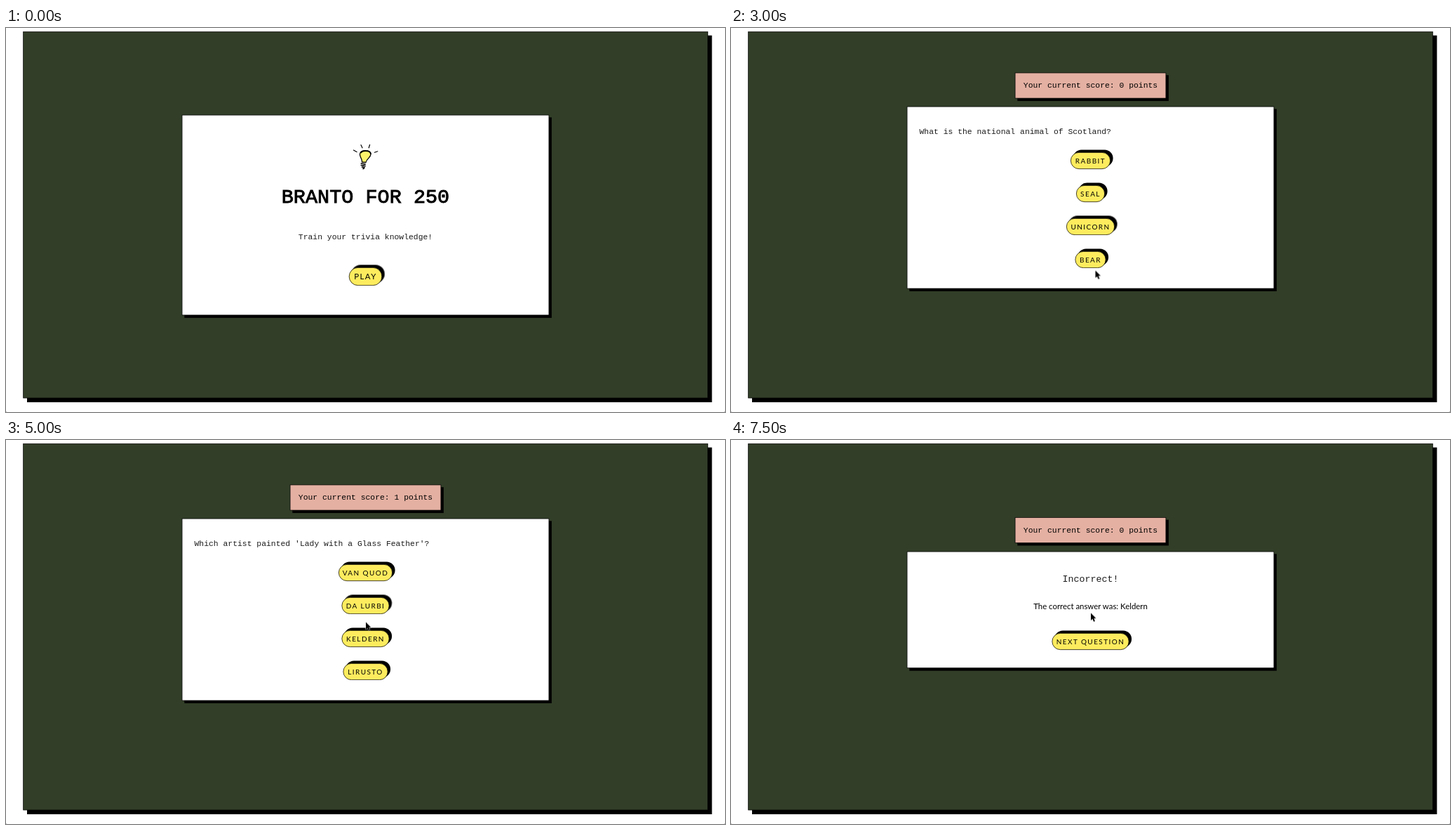
An HTML page for the animation above (8 s loop, 1025x547 px).

```html
<!DOCTYPE html>
<html lang="en">
<head>
<meta charset="utf-8">
<title>Trivia game</title>
<style>
  html, body { margin: 0; width: 100%; height: 100%; overflow: hidden; background: #fff; }
  svg { display: block; width: 100%; height: 100%; }
  text { white-space: pre; }
  .mono { font-family: "Liberation Mono", monospace; font-size: 11.4px; fill: #1c1c1c; }
  .score { fill: #000; }
  .title { font-size: 28.5px; fill: #000; stroke: #000; stroke-width: .9px; }
  .verdict { font-size: 13.3px; }
  .lato { font-family: Lato, sans-serif; font-size: 11.4px; }
  .label { font-size: 10px; letter-spacing: 1.43px; }
  .label.big { font-size: 11.4px; }
  .status { font-family: "Liberation Sans", sans-serif; font-size: 9.35px; fill: #fff; }
  .mid { text-anchor: middle; }
</style>
</head>
<body>
<svg id="stage" viewBox="0 0 1025 547"></svg>
<script>
const LOOP = 8000, CENTER = 512.5, BORDER = .72, CARD = 523.6;
const GREEN = '#323e28', PINK = '#e4b0a2', YELLOW = '#feec5e';
const stage = document.getElementById('stage');

function add(parent, tag, attrs = {}, content = '') {
  const el = document.createElementNS('http://www.w3.org/2000/svg', tag);
  for (const key in attrs) el.setAttribute(key, attrs[key]);
  el.textContent = content;
  parent.append(el);
  return el;
}

// Holds each value until the next step; steps are [ms, value].
function hold(el, prop, steps) {
  const frames = steps.map(([ms, value]) => ({ offset: ms / LOOP, [prop]: value, easing: 'step-end' }));
  frames.push({ offset: 1, [prop]: steps[steps.length - 1][1] });
  el.animate(frames, { duration: LOOP, iterations: Infinity });
}

function during(el, prop, [from, to], inside, outside) {
  const steps = from > 0 ? [[0, outside], [from, inside]] : [[0, inside]];
  if (to < LOOP) steps.push([to, outside]);
  hold(el, prop, steps);
}

function scene(from, to) {
  const g = add(stage, 'g');
  during(g, 'opacity', [from, to], 1, 0);
  return g;
}

function write(parent, cls, x, y, content) {
  return add(parent, 'text', { class: cls, x, y }, content);
}

// Box with its border drawn inside the given outer size, centred on the stage.
function bordered(parent, width, y, height, fill, radius = 0) {
  return add(parent, 'rect', {
    x: CENTER - (width - BORDER) / 2, y: y + BORDER / 2,
    width: width - BORDER, height: height - BORDER,
    rx: radius, fill, stroke: '#000', 'stroke-width': BORDER
  });
}

function panel(parent, width, y, height, fill, drop = 3.6) {
  add(parent, 'rect', { x: CENTER - width / 2 + drop, y: y + drop, width, height });
  bordered(parent, width, y, height, fill);
}

function scoreBox(parent, y, points) {
  panel(parent, 215.6, y, 36.8, PINK);
  write(parent, 'mono score mid', CENTER, y + 21.6, `Your current score: ${points} points`);
}

function pill(parent, label, width, y, { height = 24, big = false, hover, picked } = {}) {
  const x = CENTER - width / 2;
  const shadow = add(parent, 'rect', { x, y, width, height, rx: height / 2 });
  shadow.style.transform = 'translate(3.6px, -3.6px)';
  if (hover) during(shadow, 'transform', hover, 'translate(5.7px, -5.7px)', 'translate(3.6px, -3.6px)');
  const face = bordered(parent, width, y, height, YELLOW, (height - BORDER) / 2);
  if (picked) {
    during(face, 'fill', picked, PINK, YELLOW);
    const ring = add(parent, 'g', { fill: 'none' });
    for (const [stroke, size] of [['#fff', 2.6], ['#e24b9d', 1.1]])
      add(ring, 'rect', { x, y: y + .3, width, height: height - .6, rx: 1.5, stroke, 'stroke-width': size });
    during(ring, 'opacity', picked, 1, 0);
  }
  write(parent, `lato label mid${big ? ' big' : ''}`, CENTER, y + height / 2 + (big ? 4.2 : 3.6), label);
}

function question(from, to, points, prompt, answers) {
  const g = scene(from, to);
  scoreBox(g, 63.6, points);
  panel(g, CARD, 111.7, 259.7, '#fff');
  write(g, 'mono', 268.5, 151, prompt);
  answers.forEach(([label, width, options], i) => pill(g, label, width, 177 + 47 * i, options));
}

function bulb(parent) {
  const g = add(parent, 'g', { stroke: '#000', fill: 'none', 'stroke-linecap': 'round', 'stroke-linejoin': 'round' });
  add(g, 'path', { d: 'M495.5 174 500 176.6M506 166.5 508 170.8M518.6 166.3 517.2 170.8M525.3 177.2 529.8 175.8', 'stroke-width': 1.2 });
  add(g, 'path', {
    d: 'M507.5 191C508 186 504 184 504.5 179.5C505 175.5 508 174.7 512 174.8C517 174.7 520 176.5 520 180C519.8 185 514 186 513 191.5Z',
    fill: '#fdf36b', 'stroke-width': 1.3
  });
  add(g, 'path', { d: 'M506 177.5Q508 174.5 513 175Q519 175 520 179', 'stroke-width': 1.9 });
  add(g, 'path', { d: 'M506.3 193 512 194.2M506.3 195.5 512 196.6M507.5 198 511 198.8M509 200.3H510', 'stroke-width': 1.7 });
}

panel(stage, 976.4, 4.9, 522.5, GREEN, 5.7);
for (const x of [0, 1024]) add(stage, 'rect', { x, y: 546, width: 1, height: 1, fill: '#bbb' });

const home = scene(0, 2500);
panel(home, CARD, 123.7, 285.6, '#fff');
bulb(home);
write(home, 'mono title mid', CENTER, 248.7, 'BRANTO FOR 250');
write(home, 'mono mid', CENTER, 301, 'Train your trivia knowledge!');
pill(home, 'PLAY', 47.4, 341, { height: 26, big: true, hover: [2000, 2500] });

question(2500, 4500, 0, 'What is the national animal of Scotland?', [
  ['RABBIT', 57],
  ['SEAL', 41],
  ['UNICORN', 69, { hover: [4000, 4500], picked: [4250, 4500] }],
  ['BEAR', 44]
]);

const right = scene(4500, 5000);
scoreBox(right, 136.5, 1);
panel(right, CARD, 184.7, 113, '#fff');
write(right, 'mono verdict mid', CENTER, 228, 'Correct!');
pill(right, 'NEXT QUESTION', 110, 251, { hover: [4750, 5000] });

question(5000, 7250, 1, "Which artist painted 'Lady with a Glass Feather'?", [
  ['VAN QUOD', 77],
  ['DA LURBI', 68, { hover: [7000, 7250], picked: [7000, 7250] }],
  ['KELDERN', 68],
  ['LIRUSTO', 64]
]);

const wrong = scene(7250, LOOP);
scoreBox(wrong, 110, 0);
panel(wrong, CARD, 158.7, 166.4, '#fff');
write(wrong, 'mono verdict mid', CENTER, 201.5, 'Incorrect!');
write(wrong, 'lato mid', CENTER, 241, 'The correct answer was: Keldern');
pill(wrong, 'NEXT QUESTION', 110, 275);

const status = scene(2250, 3000);
add(status, 'path', { d: 'M0 533H86Q88 533 88 535V547H0Z', fill: '#3c6462', stroke: '#000', 'stroke-opacity': .2 });
write(status, 'status', 2.5, 543.5, 'localhost:3000/play');

const pointer = add(stage, 'path', {
  d: 'M0 0V10.4L2.4 8.2 4.1 12.2 5.9 11.4 4.3 7.6H7.5Z',
  stroke: '#fff', 'stroke-width': .9, 'paint-order': 'stroke'
});
const pointerPath = [
  [0, -20, -20], [500, 553, 3], [750, 523.5, 239], [1000, 514.5, 283], [1250, 540, 341.5],
  [1500, 546, 331.5], [1750, 540.5, 333.5], [2000, 519.5, 345.5], [3250, 508.5, 219.5],
  [3500, 498.5, 163.5], [3750, 503.5, 230], [4000, 512, 279.5], [4750, 513, 259.5],
  [6500, 513, 258.5], [6750, 513, 251.5], [7000, 513, 246.5]
];
hold(pointer, 'transform', pointerPath.map(([ms, x, y]) => [ms, `translate(${x}px, ${y}px)`]));
</script>
</body>
</html>
```
